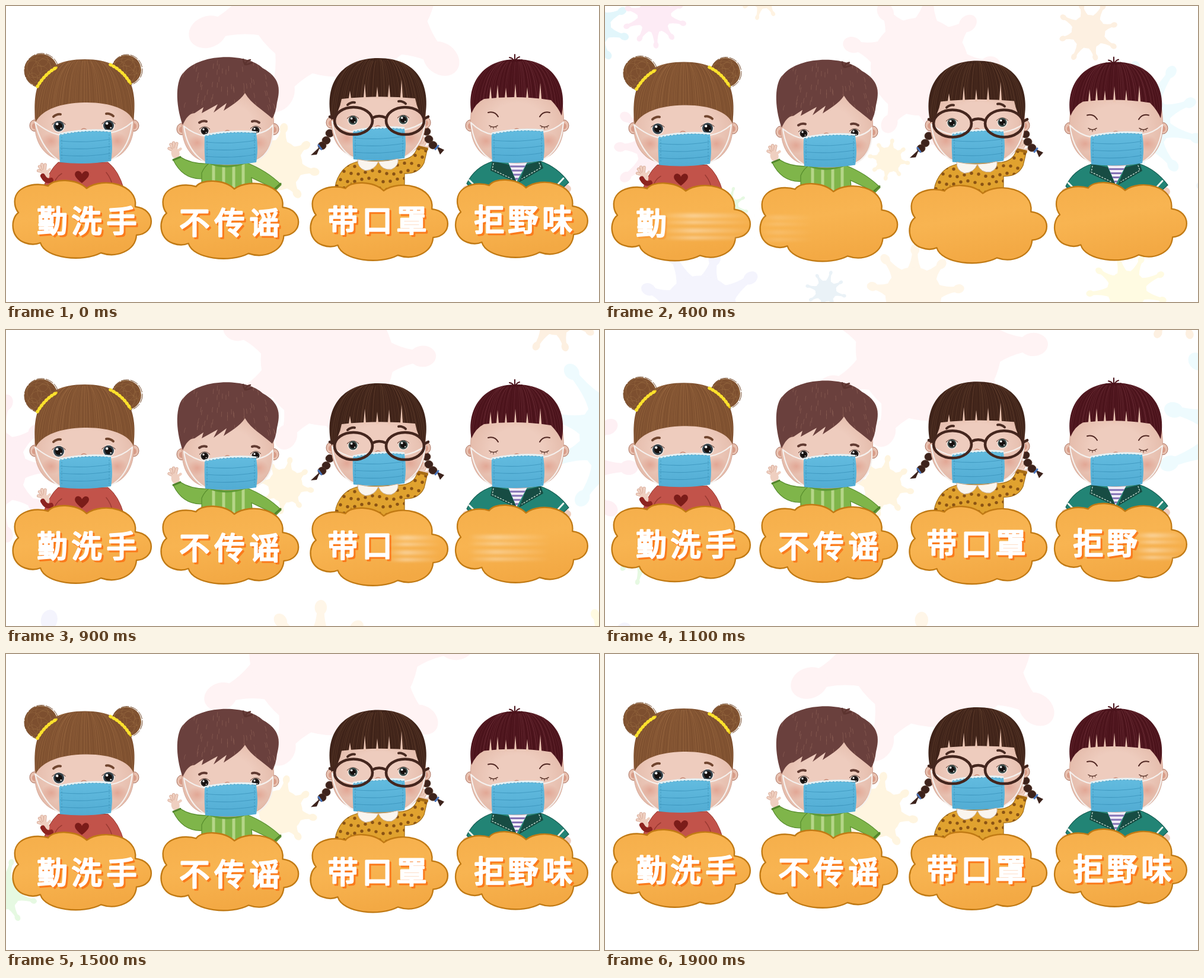
Write an HTML page that moves like this. It is 1000 px wide and 500 px high and loops after 2000 ms.

```html
<!DOCTYPE html>
<html lang="zh">
<head>
<meta charset="utf-8">
<style>
html, body { margin: 0; width: 100%; height: 100%; overflow: hidden; background: #fff; }
svg { display: block; width: 100vw; height: 100vh; }
text { font: 400 51px "Noto Sans CJK SC", "Noto Sans CJK", sans-serif; text-anchor: middle; stroke-width: 3; stroke-linejoin: round; }
.line { fill: none; stroke-linecap: round; stroke-linejoin: round; }
</style>
</head>
<body>
<svg id="stage" viewBox="0 0 1000 500">
  <defs>
    <linearGradient id="cloudFill" x2=".3" y2="1">
      <stop stop-color="#f5ae4a"/><stop offset=".5" stop-color="#f8b451"/><stop offset="1" stop-color="#f3a944"/>
    </linearGradient>
    <radialGradient id="skin" cy=".5" r=".56">
      <stop offset=".5" stop-color="#eeccbe"/><stop offset="1" stop-color="#e3b9a8"/>
    </radialGradient>
    <radialGradient id="blush">
      <stop stop-color="#de9a87" stop-opacity=".7"/><stop offset="1" stop-color="#de9a87" stop-opacity="0"/>
    </radialGradient>
    <linearGradient id="maskFill" x2="0" y2="1">
      <stop stop-color="#62bbdf"/><stop offset="1" stop-color="#52acd3"/>
    </linearGradient>
    <linearGradient id="streakFill">
      <stop stop-color="#fff" stop-opacity=".15"/><stop offset=".3" stop-color="#fff" stop-opacity=".75"/>
      <stop offset="1" stop-color="#fff" stop-opacity="0"/>
    </linearGradient>
    <filter id="soft" x="-10%" y="-30%" width="120%" height="160%"><feGaussianBlur stdDeviation="5 2"/></filter>
  </defs>
  <g id="germs"></g>
  <g id="cast"></g>
</svg>
<script>
const $ = id => document.getElementById(id);
const range = n => Array.from({ length: n }, (_, i) => i);
let seed = 7;
const rand = () => (seed = seed * 16807 % 2147483647) / 2147483647;

const shape = (d, fill, extra = '') => `<path d="${d}" fill="${fill}" ${extra}/>`;
const line = (d, color, width, extra = '') => `<path class="line" d="${d}" stroke="${color}" stroke-width="${width}" ${extra}/>`;
const oval = (x, y, rx, ry, fill, extra = '') => `<ellipse cx="${x}" cy="${y}" rx="${rx}" ry="${ry}" fill="${fill}" ${extra}/>`;
const dot = (x, y, r, fill) => oval(x, y, r, r, fill);
const clipped = (id, d, inner) => `<clipPath id="${id}"><path d="${d}"/></clipPath><g clip-path="url(#${id})">${inner}</g>`;

// ---- background germs: x, y, body radius, reach, colour, spikes, first angle
function germ(x, y, r, reach, color, spikes = 9, turn = 15) {
  const arms = range(spikes).map(i => {
    const far = reach * (i % 2 ? 0.88 : 0.96);
    return `<g transform="rotate(${turn + i * 360 / spikes})">` +
      shape(`M${r * .8} ${-r * .34}Q${r * 1.1} ${-r * .1} ${far} ${-r * .09}V${r * .09}Q${r * 1.1} ${r * .1} ${r * .8} ${r * .34}Z`, color) +
      oval(far, 0, r * .2, r * .16, color) + '</g>';
  });
  return `<g transform="translate(${x} ${y})">${arms.join('')}${dot(0, 0, r, color)}</g>`;
}
$('germs').innerHTML = [
  [526, 125, 70, 105, '#fff3f4', 9, -162],
  [52, 68, 33, 56, '#e2f6fb'], [147, 52, 24, 44, '#fdebf5', 10],
  [302, 24, 18, 33, '#fff3e2', 8], [767, 75, 24, 43, '#fdf0e1', 8, 30],
  [843, 10, 10, 19, '#fdeedd', 8], [992, 35, 30, 54, '#f1f0fc'],
  [165, 240, 44, 76, '#fef0f4', 10, 0], [838, 205, 46, 90, '#eefbfe', 10],
  [988, 290, 38, 62, '#eff6fb'], [253, 325, 14, 27, '#e6f9e2', 8],
  [482, 258, 18, 28, '#fff5e0', 8, 10], [392, 446, 15, 28, '#eaf2f7', 8],
  [212, 478, 54, 92, '#f4f4fd', 9, 5], [517, 452, 40, 68, '#fff6e8', 9, -88],
  [822, 445, 28, 55, '#fffbe2', 9], [987, 465, 30, 52, '#ffeff5'],
  [12, 500, 20, 38, '#e8f8fc', 8], [553, 508, 14, 26, '#e8f9fb', 8], [742, 500, 9, 17, '#e4f8fa', 8]
].map(g => germ(...g)).join('');

// ---- shared body parts
function cloud(dx, dy, sx) {
  return `<g transform="translate(${dx} ${dy}) scale(${sx} 1)">` + shape(
    'M71 305C50 298 11 305 15 336Q16 344 21 350C7 360 7 393 32 401Q46 406 58 401C66 428 130 434 160 418C186 427 218 415 220 388C253 386 254 344 218 340C223 302 164 289 136 309C118 292 80 292 71 305Z',
    'url(#cloudFill)', 'stroke="#c17a14" stroke-width="2.4" stroke-linejoin="round"') + '</g>';
}

function mask(x, y, leftEar, rightEar) {
  const at = (px, py) => `${x + px} ${y + py}`;
  const strap = d => line(d, '#f5f0ed', 2.2);
  return strap(`M${at(2, 3)}Q${at(-18, 0)} ${leftEar}Q${at(-30, 28)} ${at(1, 47)}`) +
    strap(`M${at(86, -1)}Q${at(106, -4)} ${rightEar}Q${at(118, 28)} ${at(87, 45)}`) +
    shape(`M${at(0, 3)}Q${at(44, -7)} ${at(87, -2)}Q${at(91, 23)} ${at(87, 47)}Q${at(44, 54)} ${at(1, 49)}Q${at(-1, 25)} ${at(0, 3)}Z`, 'url(#maskFill)') +
    [13, 25, 37].map(h => line(`M${at(2, h)}Q${at(44, h + 4)} ${at(86, h - 3)}`, '#3a93bb', 1.2, 'opacity=".75"')).join('') +
    line(`M${at(1, 1)}Q${at(44, -8)} ${at(86, -4)}`, '#e3f3f8', 3) +
    line(`M${at(2, 2)}Q${at(44, -6)} ${at(86, -2)}`, '#489fc4', 1.3, 'stroke-dasharray="1 5"') +
    line(`M${at(84, 2)}L${at(84, 43)}M${at(4, 6)}L${at(4, 45)}`, '#368fb6', 1, 'stroke-dasharray="2 3" opacity=".7"');
}

function head(cx, cy, rx, earY) {
  const px = (u, dy) => `${cx + u * rx} ${cy + dy}`;
  const ear = side => oval(cx + side * (rx + 1), earY, 8, 9.5, '#e8c1b0', 'stroke="#a9705e" stroke-width="1"') +
    oval(cx + side * (rx + 1), earY + 1, 4, 5, '#d89c88');
  const face = `M${px(-.97, -45)}C${px(-1.03, -10)} ${px(-1.05, 22)} ${px(-.78, 43)}C${px(-.5, 66)} ${px(.5, 66)} ${px(.78, 43)}` +
    `C${px(1.05, 22)} ${px(1.03, -10)} ${px(.97, -45)}Q${px(0, -95)} ${px(-.97, -45)}Z`;
  return ear(-1) + ear(1) + shape(face, 'url(#skin)', 'stroke="#c99583" stroke-width=".7"') +
    oval(cx - rx * .67, cy + 23, 17, 14, 'url(#blush)') + oval(cx + rx * .67, cy + 23, 17, 14, 'url(#blush)') +
    line(`M${cx - 5} ${cy + 4}q4 -4 9 0`, '#c98c78', 1.3);
}

const eye = (x, y, r, iris = '#2b2422') =>
  dot(x, y, r + 1.3, '#f6ece7') + line(`M${x - r - 2} ${y - 3}Q${x} ${y - r - 5} ${x + r + 2} ${y - 3}`, '#6a463a', 1.1) +
  dot(x, y, r, iris) + dot(x, y, r * .68, '#15100f') + dot(x - r * .3, y - r * .4, r * .24, '#fff') + dot(x + r * .4, y + r * .4, r * .13, '#fff');
const brow = (x, y, tilt, color) => line(`M${x - 6} ${y + tilt}Q${x} ${y - 3} ${x + 6} ${y - tilt}`, color, 4);

// Fine strands fanning from the crown, kept inside the hair outline.
function strands(id, d, cx, half, top, bottom, color, count = 46) {
  return clipped(id, d, range(count).map(i => {
    const u = (i + rand()) / count * 2 - 1, x = cx + u * half;
    return line(`M${cx + u * half * .45} ${top + rand() * 8}Q${x} ${top + 22} ${x + u * 3} ${bottom}`, color, .8, `opacity="${.12 + rand() * .35}"`);
  }).join(''));
}
const slits = (xs, y) => xs.map(([x, h]) => shape(`M${x - 2.2} ${y + 2}L${x} ${y - h}L${x + 2.2} ${y + 2}Z`, '#ecc6b4')).join('');

const hand = (x, y, tilt) => `<g transform="translate(${x} ${y}) rotate(${tilt})">` +
  [[-9, -6], [-5, -12], [0, -14], [5, -12]].map(([a, b]) => line(`M0 0L${a} ${b}`, '#cf9c88', 5.2) + line(`M0 0L${a} ${b}`, '#efcfc0', 4)).join('') +
  line('M0 3L10 -2', '#efcfc0', 4.5) + oval(0, 4, 7, 9, '#efcfc0') + '</g>';

// ---- the four children
function bunGirl() {
  const hair = 'M50 196C44 140 54 90 133 90C211 90 222 140 215 194C207 174 174 162 132 163C92 164 62 174 50 196Z';
  const bun = (x, y, r) => dot(x, y, r, '#7d4f2f') + range(11).map(i => {
    const a = i * 2.4, q = r * (.25 + i * .065);
    return `<circle class="line" cx="${x + Math.cos(a) * (r - q)}" cy="${y + Math.sin(a) * (r - q)}" r="${q}" stroke="#a87a4e" stroke-width=".8" opacity=".4"/>`;
  }).join('') + `<circle class="line" cx="${x + 1}" cy="${y}" r="${r + 1}" stroke="#744a2c" stroke-width="1" stroke-dasharray="13 3"/>`;
  const band = d => line(d, '#e8c51c', 4) + line(d, '#fbe12d', 5.5, 'stroke-dasharray="1 5"');
  return shape('M88 264Q72 278 62 310H199Q190 278 172 264Z', '#c2534a', 'stroke="#98392f" stroke-width="1"') +
    line('M94 283Q82 290 80 306M169 281Q178 292 180 306', '#9a3a32', 1.5) + hand(65, 281, -18) +
    line('M62 287Q68 298 76 294', '#8d2420', 8) +
    shape('M128 299C116 290 114 284 118 280C122 277 127 280 128 284C130 279 136 277 139 281C142 286 138 291 128 299Z', '#7b1c19') +
    bun(59, 109, 28) + bun(203, 108, 25) +
    head(132, 205, 83, 202) + shape(hair, '#7f5130') + strands('hairA', hair, 132, 83, 88, 198, '#b98454', 50) +
    band('M53 136Q66 114 85 104') + band('M176 99Q197 109 210 131') +
    eye(89, 203, 9, '#34434c') + eye(173, 202, 9, '#34434c') + brow(86, 185, 2, '#70452f') + brow(175, 184, -2, '#70452f') +
    mask(90, 215, '49 196', '213 196');
}

function waveBoy() {
  const hair = 'M298 201C285 165 286 124 300 112C326 80 405 78 433 105C462 121 463 140 457 163Q455 181 449 190C433 175 414 166 403 147C394 161 378 169 367 177L372 164L350 180L357 166L330 181L333 171L318 181C309 181 303 190 298 201Z';
  const flecks = range(85).map(() => {
    const x = 290 + rand() * 168, y = 90 + rand() * 95;
    return line(`M${x} ${y}q${(x - 374) * .03} 3 ${(x - 374) * .03} 8`, '#8f6358', 1, 'opacity=".6"');
  }).join('');
  const torso = 'M345 264Q335 270 330 282V310H416L414 290L456 310L464 302Q440 278 404 264Z';
  const arm = 'M282 260L294 255Q314 268 346 266L338 291Q300 297 282 260Z';
  return hand(285, 245, -10) + shape(arm, '#7fb54a', 'stroke="#568c2c" stroke-width="1.2"') +
    shape(torso, '#7fb54a', 'stroke="#568c2c" stroke-width="1.2"') +
    clipped('torsoB', torso, [350, 367, 384, 400].map(x => line(`M${x} 262V312`, '#b5d588', 5)).join('')) +
    line('M282 260L294 255M454 308L463 300', '#50842c', 3) + line('M346 266Q374 276 405 264', '#5f9a35', 4) +
    head(374, 208, 77, 208) + shape(hair, '#6a403d') + clipped('hairB', hair, flecks) +
    line('M403 99Q400 93 400 90M404 98Q405 92 412 91M405 99L415 96', '#5c332f', 2.5) +
    eye(335, 211, 6.5) + eye(421, 210, 6.5) + brow(332, 196, 1, '#613b32') + brow(421, 196, -1, '#613b32') +
    mask(335, 217, '300 203', '450 201');
}

function glassesGirl() {
  const hair = 'M549 193C535 130 566 88 628 88C694 88 718 134 706 192Q694 178 690 156Q628 150 566 157Q562 180 549 193Z';
  const torso = 'M597 262Q574 266 563 284Q553 300 555 318H578L582 298V318H672V283Q696 284 705 265L711 240L694 236Q690 262 655 260Z';
  const lens = x => oval(x, 194, 32, 23, 'none', 'stroke="#44261e" stroke-width="4.6"');
  const braid = (pts, tie) => pts.map(([x, y]) => oval(x, y, 7, 6.5, '#3d231c', 'stroke="#583a2d" stroke-width=".8"')).join('') + tie;
  const dots = range(90).map(i => {
    const row = Math.floor(i / 15), x = 552 + (i % 15) * 12 + row % 2 * 6;
    return dot(x, 242 + row * 13 + Math.sin(i * 5) * 3, 2.7, '#8a5314');
  }).join('');
  return hand(702, 238, 10) + shape(torso, '#e0a22f', 'stroke="#a46e17" stroke-width="1.2"') + clipped('torsoC', torso, dots) +
    line('M694 238L710 242', '#a86c14', 4) +
    braid([[546, 215], [540, 227], [533, 236]], shape('M530 237L514 252L524 251Z', '#3d231c') + line('M527 235L532 242', '#4774bd', 3)) +
    braid([[709, 212], [713, 225], [720, 235]], shape('M726 237L739 243L732 251Z', '#3d231c') + line('M724 242L729 236', '#4774bd', 3)) +
    head(628, 200, 79, 197) + shape(hair, '#3f2319') + strands('hairC', hair, 628, 80, 86, 192, '#8a6046', 48) +
    slits([[580, 12], [605, 24], [626, 19], [646, 23], [667, 31]], 155) +
    eye(585, 193, 7.5, '#3b4d4b') + eye(670, 192, 7.5, '#3b4d4b') + brow(582, 165, 2, '#492b22') + brow(668, 163, -2, '#492b22') +
    mask(585, 210, '550 195', '707 194') +
    lens(586) + lens(673) + line('M618 189Q629 183 641 189M554 190L546 187M706 190L712 187', '#44261e', 4.6) +
    shape('M593 259Q592 273 606 278Q622 277 628 263Q634 278 650 276Q663 270 661 258Q628 267 593 259Z', '#faf5ee', 'stroke="#c7ad94" stroke-width="1"');
}

function calmBoy() {
  const hair = 'M785 181C776 130 805 90 860 90C921 90 948 132 937 185Q931 171 919 159Q862 150 806 157Q792 164 785 181Z';
  const torso = 'M822 262Q790 272 777 300L787 311L806 306V316H918V304L938 308L949 298Q930 272 901 262Z';
  const shirt = 'M847 264L861 297L879 264Z';
  const lid = (x, s) => line(`M${x - 7} 202Q${x} 207 ${x + 7} 202`, '#593329', 1.5) +
    line(`M${x - 4} 204l-1 2M${x} 205v3M${x + 4} 204l1 2`, '#593329', .9) +
    line(`M${x - s * 9} 180Q${x + s * 2} 177 ${x + s * 8} 187`, '#502722', 2);
  return oval(782, 309, 12, 7, '#efcebe') + oval(942, 309, 11, 8, '#efcebe') +
    shape(torso, '#228475', 'stroke="#125a4f" stroke-width="1.2"') +
    shape(shirt, '#f3eef8') +
    clipped('shirtD', shirt, [271, 278, 285, 292].map(y => line(`M835 ${y}H890`, '#8271b4', 3)).join('')) +
    shape('M820 262L817 278L861 298L848 268ZM902 262L906 274L865 298L877 268Z', '#174c43') +
    line('M822 266L820 276L855 293M899 265L902 273L870 292', '#cfe3d7', 1.3, 'stroke-dasharray="2 3"') +
    line('M781 294L793 306M928 304L940 291', '#eef5ef', 3) +
    head(862, 205, 78, 202) + shape(hair, '#4b131b') + strands('hairD', hair, 861, 78, 88, 182, '#95505a', 42) +
    line('M858 93L858 82M857 93Q855 88 849 87M859 93Q861 87 866 86M856 94L845 92M861 94L870 91', '#4b131b', 2) +
    slits([[817, 20], [829, 23], [843, 18], [859, 25], [879, 19], [901, 26]], 156) +
    lid(822, 1) + lid(908, -1) + mask(819, 214, '784 197', '940 196');
}

// ---- words on the clouds
const words = [
  { left: 52, chars: '勤洗手', xs: [78, 136, 195], y: 363 },
  { left: 292, chars: '不传谣', xs: [318, 377, 436], y: 366 },
  { left: 541, chars: '带口罩', xs: [568, 626, 684], y: 362 },
  { left: 789, chars: '拒野味', xs: [815, 872, 930], y: 361 }
];
// Sweep of light before each character lands: from, to, strength.
const streakSpans = [[-27, 58, .2], [-4, 128, .45], [52, 198, .5], [108, 190, .55]];

function wordMarkup({ chars, xs, y }) {
  const glyph = (c, i) => {
    const copy = (cls, d, color) => `<text class="${cls}" x="${xs[i] + d}" y="${y + 19 + d}" fill="${color}" stroke="${color}">${c}</text>`;
    return `<g class="glyph">${copy('shade', 3, '#fb7a1c')}${copy('', 0, '#fff')}</g>`;
  };
  const streaks = [-17, -5, 8, 21].map((dy, i) => `<rect y="${y + dy}" width="1" height="${i % 2 ? 6 : 8}" fill="url(#streakFill)"/>`).join('');
  return `<g class="word">${[...chars].map(glyph).join('')}<g class="streak" filter="url(#soft)">${streaks}</g></g>`;
}

$('cast').innerHTML = bunGirl() + waveBoy() + glassesGirl() + calmBoy() +
  cloud(0, -1, 1) + cloud(250, 0, .993) + cloud(502, 3, .992) + cloud(747, -2, .955) +
  words.map(wordMarkup).join('');

const wordNodes = [...document.querySelectorAll('.word')].map(node => ({
  glyphs: [...node.querySelectorAll('.glyph')],
  shades: [...node.querySelectorAll('.shade')],
  streak: node.querySelector('.streak'),
  bars: [...node.querySelectorAll('rect')]
}));

// The picture advances in ticks of 100 ms, 20 to a loop.
function draw(tick) {
  const bob = 4 * (1 - Math.cos((tick - 1) * Math.PI / 5)) - .76;
  $('cast').setAttribute('transform', `translate(0 ${bob})`);

  const u = (tick || 20) - 2;
  const zoom = 1 + .092 * u - .0009 * u * u;
  $('germs').setAttribute('transform', `translate(500 250) scale(${zoom}) translate(-500 -250)`);

  wordNodes.forEach(({ glyphs, shades, streak, bars }, w) => {
    const age = u - 2 * w;
    glyphs.forEach((g, i) => g.setAttribute('visibility', age >= 2 + i ? 'visible' : 'hidden'));
    shades.forEach(s => s.setAttribute('opacity', age === 2 ? .3 : 1));
    const span = streakSpans[age];
    streak.setAttribute('visibility', span ? 'visible' : 'hidden');
    if (!span) return;
    const [from, to, opacity] = span;
    streak.setAttribute('opacity', opacity);
    bars.forEach(b => {
      b.setAttribute('x', words[w].left + from);
      b.setAttribute('width', to - from);
    });
  });
}

let shown = -1;
const start = performance.now();
function loop(now) {
  const tick = Math.floor(Math.max(0, now - start) / 100) % 20;
  if (tick !== shown) draw(shown = tick);
  requestAnimationFrame(loop);
}
loop(start);
</script>
</body>
</html>
```
